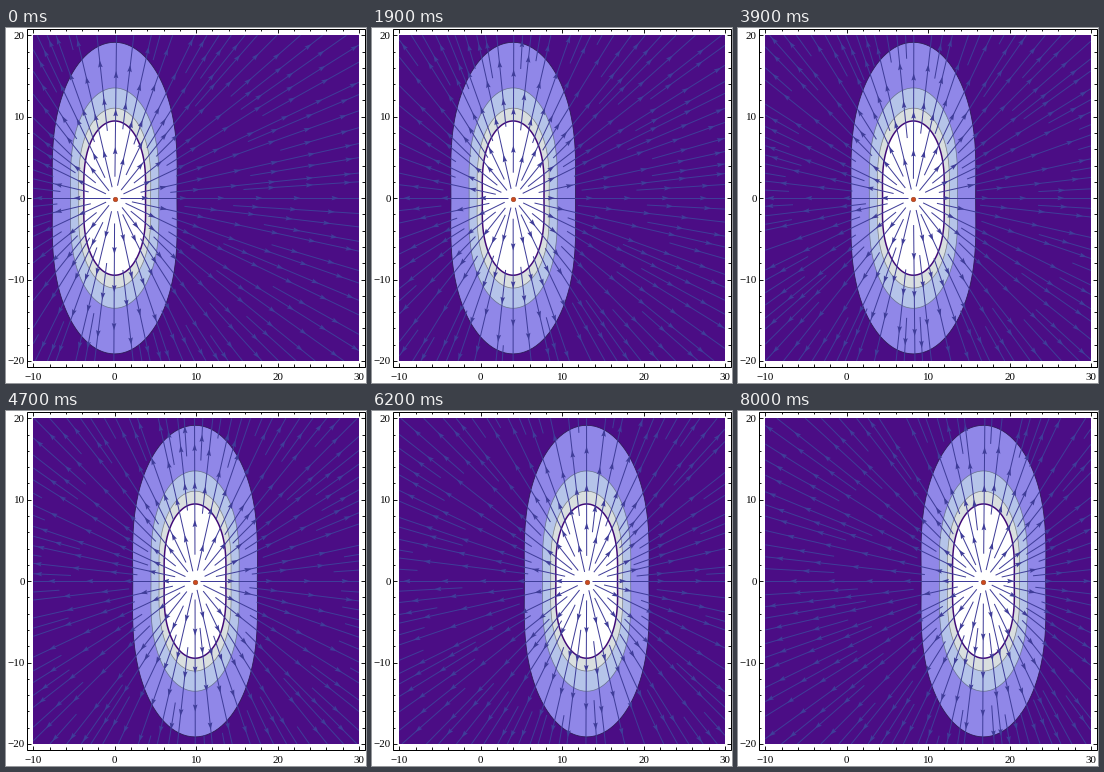
Recreate the animation shown at these times as a matplotlib script. Size 360 by 355 pixels, loop 8.1 s.

```python
import numpy as np
import matplotlib.pyplot as plt
from matplotlib.animation import FuncAnimation
from matplotlib.collections import LineCollection, PolyCollection
from matplotlib.patches import Rectangle

WIDTH, HEIGHT, DPI = 360, 355, 100
FRAMES, INTERVAL = 81, 100
SCALE, X0, Y0 = 8.14, 108.7, 170.1        # pixels per unit, pixel of (0, 0)
LEFT, TOP, RIGHT, BOTTOM = 20.5, 0.5, 358.5, 338.5
SPEED, TIME_STEP = 0.84, 0.25
GAMMA = 1 / np.sqrt(1 - SPEED ** 2)
PURPLE = "#4b0d85"
STREAM = "#3f3d99"

plt.rcParams["font.family"] = "Liberation Serif"


def px(pixels):
    return pixels * 72 / DPI


def to_x(x):
    return X0 + x * SCALE


def to_y(y):
    return Y0 - y * SCALE


fig = plt.figure(figsize=(WIDTH / DPI, HEIGHT / DPI), dpi=DPI, facecolor="white")
ax = fig.add_axes([0, 0, 1, 1])
ax.set(xlim=(0, WIDTH), ylim=(HEIGHT, 0))
ax.axis("off")

region = Rectangle((to_x(-10), to_y(20)), 40 * SCALE, 40 * SCALE, fc=PURPLE, ec="none")
ax.add_patch(region)


def draw_frame():
    ax.add_patch(Rectangle((LEFT, TOP), RIGHT - LEFT, BOTTOM - TOP,
                           fill=False, ec="black", lw=px(1)))
    ticks = []
    for v in range(-20, 31, 2):
        size = 4 if v % 10 == 0 else 2.5
        if v >= -10:
            x = to_x(v)
            ticks += [[(x, BOTTOM), (x, BOTTOM - size)], [(x, TOP), (x, TOP + size)]]
        if v <= 20:
            y = to_y(v)
            ticks += [[(LEFT, y), (LEFT + size, y)], [(RIGHT, y), (RIGHT - size, y)]]
    ax.add_collection(LineCollection(ticks, colors="black", linewidths=px(0.9)))
    for v in range(-20, 31, 10):
        text = str(v).replace("-", "\u2212")
        if v >= -10:
            ax.text(to_x(v), 349, text, size=px(11), ha="center", va="center_baseline")
        if v <= 20:
            ax.text(18.5, to_y(v), text, size=px(11), ha="right", va="center_baseline")


draw_frame()

# Lines of equal field strength around a uniformly moving charge.
angle = np.linspace(0, 2 * np.pi, 241)
flatness = (GAMMA ** 2 * np.cos(angle) ** 2 + np.sin(angle) ** 2) ** -0.75
unit = np.column_stack([np.cos(angle), np.sin(angle)]) * flatness[:, None]
BANDS = ["#9087e8", "#b5c4e9", "#d9dfdf", "#ffffff"]
contours = [unit * 19.14 * SCALE / np.sqrt(level) for level in (1, 2, 3, 4.08)]
bands = PolyCollection(contours, facecolors=BANDS, linewidths=[px(w) for w in (0.8, 0.7, 0.7, 1.5)],
                       edgecolors=["#2c1a55", "#66708c", "#7c8086", "#400a78"])
lines = LineCollection([], colors=STREAM, linewidths=px(1))
heads = PolyCollection([], facecolors=STREAM, edgecolors="none")
for artist in (bands, lines, heads):
    ax.add_collection(artist)
    artist.set_clip_path(region)
dot, = ax.plot([], [], "o", ms=px(4.6), mfc="#cc4a1c", mec="#8c3a24", mew=px(0.5))

HEAD = np.array([(3.8, 0), (-3.4, 2.3), (-2.3, 0), (-3.4, -2.3)])


def exit_distance(cx, direction):
    """Distance from the charge to the border of the plot region."""
    dx, dy = direction
    reach = [20 * SCALE / max(abs(dy), 1e-9)]
    border = to_x(30) if dx > 0 else to_x(-10)
    reach.append((border - cx) / dx if abs(dx) > 1e-9 else np.inf)
    return min(reach)


def streams(cx, rng):
    """Radial streams; new ones start where older ones have spread apart."""
    segments, arrows = [], []
    count = 112
    for i in range(count):
        if i % 8 == 0:
            start = 11
        elif i % 4 == 0:
            start = 22
        elif i % 2 == 0:
            start = 58
        else:
            start = 145
        start *= rng.uniform(0.8, 1.25)
        phase = rng.uniform(22, 34)
        theta = 2 * np.pi * i / count
        if i % (count // 2):
            theta += rng.uniform(-0.2, 0.2) * 2 * np.pi / count
        else:
            start = 5
        c, s = np.cos(theta), np.sin(theta)
        end = exit_distance(cx, (c, s))
        if start + 8 > end:
            continue
        origin = np.array([cx, Y0])
        direction = np.array([c, s])
        segments.append([origin + direction * start, origin + direction * end])
        turn = np.array([(c, s), (-s, c)])
        for r in np.arange(start + phase, end - 4, 38):
            arrows.append(HEAD @ turn + origin + direction * r)
    return segments, arrows


def update(frame):
    cx = to_x(SPEED * TIME_STEP * frame)
    bands.set_verts([c + (cx, Y0) for c in contours])
    segments, arrows = streams(cx, np.random.default_rng(frame))
    lines.set_segments(segments)
    heads.set_verts(arrows)
    dot.set_data([cx], [Y0 + 0.4])
    return bands, lines, heads, dot


animation = FuncAnimation(fig, update, frames=FRAMES, interval=INTERVAL,
                          repeat=True, repeat_delay=0)
plt.show()
```
